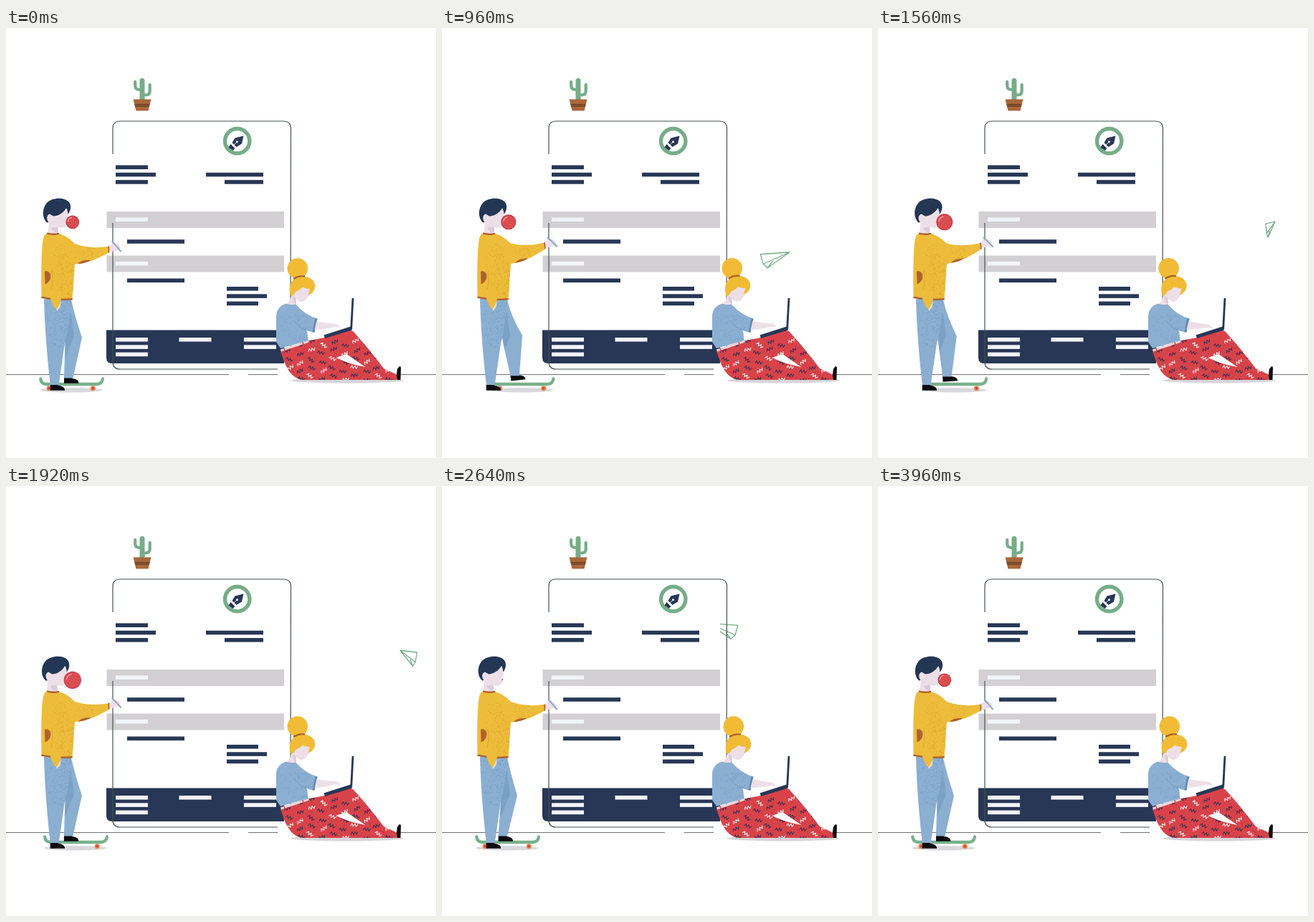
These frames come from a looping animation (600 px wide and 600 px high, 4000 ms). An HTML page with a canvas:

```html
<!DOCTYPE html>
<html lang="en">
<head>
<meta charset="utf-8">
<title>Invoice scene</title>
<style>
html, body { margin: 0; width: 100%; height: 100%; overflow: hidden; background: #fff; }
canvas { display: block; width: 600px; height: 600px; }
</style>
</head>
<body>
<canvas id="stage" width="600" height="600"></canvas>
<script>
const ctx = document.getElementById('stage').getContext('2d');
const LOOP = 4000, STEP = 40, POP = 2640, REGROW = 3200;
const NAVY = '#283755', GREEN = '#76ad88', YELLOW = '#edbc3a', BLUE = '#8bafd1',
  SKIN = '#eddfe8', BROWN = '#ad632f', RED = '#d8434a', BLACK = '#0b0a10', PALE = '#f1f4f8';

const fill = (d, color) => {
  ctx.fillStyle = color;
  ctx.fill(new Path2D(d));
};

function line(d, color, width, cap = 'butt') {
  ctx.strokeStyle = color;
  ctx.lineWidth = width;
  ctx.lineCap = cap;
  ctx.lineJoin = 'round';
  ctx.stroke(new Path2D(d));
}

function disc(x, y, r, color, ry = r) {
  ctx.fillStyle = color;
  ctx.beginPath();
  ctx.ellipse(x, y, r, ry, 0, 0, Math.PI * 2);
  ctx.fill();
}

function arc(x, y, r, from, to, color, width) {
  ctx.strokeStyle = color;
  ctx.lineWidth = width;
  ctx.lineCap = 'round';
  ctx.beginPath();
  ctx.arc(x, y, r, from, to);
  ctx.stroke();
}

function bar(x, y, w, h, color) {
  ctx.fillStyle = color;
  ctx.fillRect(x, y, w, h);
}

// Text lines stood in for by bars, one under the other
function stack(x, y, widths, color = NAVY, alignRight = false) {
  widths.forEach((w, i) => bar(alignRight ? x - w : x, y + i * 10.3, w, 5.6, color));
}

// Draws in a frame moved by (dx, dy) and turned around (px, py)
function posed(dx, dy, angle, px, py, draw) {
  ctx.save();
  ctx.translate(px + dx, py + dy);
  ctx.rotate(angle * Math.PI / 180);
  ctx.translate(-px, -py);
  draw();
  ctx.restore();
}

function clipped(d, draw) {
  ctx.save();
  ctx.clip(new Path2D(d));
  draw();
  ctx.restore();
}

function random(seed) {
  return () => (seed = (seed * 16807) % 2147483647) / 2147483647;
}

// Speckles inside a shape, denser towards the right
function grain(d, x, y, w, h, count, color) {
  const rnd = random(count * 31 + x);
  clipped(d, () => {
    for (let i = 0; i < count; i++) bar(x + w * Math.sqrt(rnd()), y + h * rnd(), 0.9, 0.9, color);
  });
}

const clamp = u => Math.max(0, Math.min(1, u));

// Smooth rise and fall between two times
const swell = (t, from, to) => Math.sin(Math.PI * clamp((t - from) / (to - from))) ** 2;

// Catmull-Rom spline through evenly timed points
function along(points, s) {
  const i = Math.min(points.length - 2, Math.floor(s)), u = s - i;
  const at = k => points[Math.max(0, Math.min(points.length - 1, k))];
  return [0, 1].map(n => {
    const [a, b, c, d] = [i - 1, i, i + 1, i + 2].map(k => at(k)[n]);
    return b + u / 2 * (c - a + u * (2 * a - 5 * b + 4 * c - d + u * (3 * (b - c) + d - a)));
  });
}

function cactus() {
  line('M180.2 75V80Q180.2 86 186 86H190M200.7 79V88Q200.7 93.5 195 93.5H190', GREEN, 4.2, 'round');
  line('M190 73.5V100', GREEN, 7, 'round');
  fill('M177.5 99.5H202.5L198.5 115.5H181.5Z', '#a9673a');
  line('M179.3 106.8H200.7M180 109H200', '#40271b', 0.9);
}

function card() {
  line('M0 483.6H311M338 483.6H379M549 483.6H600', '#6a6a70', 1);
  [256, 317.5].forEach(y => {
    bar(140.5, y, 247.5, 23, '#d2d0d3');
    stack(153, y + 8.4, [45], PALE);
  });
  stack(153, 191.5, [45, 56, 45]);
  stack(359, 201.8, [80, 54], NAVY, true);
  stack(169, 295.2, [80]);
  stack(169, 349.5, [80]);
  stack(308, 361, [44, 56, 44]);
  fill('M140 421.5H388V468H148Q140 468 140 460Z', NAVY);
  stack(153, 432, [45, 45, 45], PALE);
  stack(241.5, 432, [45], PALE);
  stack(332, 432, [45, 45], PALE);
  line('M149 176V140Q149 130 159 130H387Q397.5 130 397.5 140L397 450M379 476H159Q149 476 149 466V272', '#46514f', 1.2);
}

function nib() {
  arc(322.7, 157.7, 17.2, 0, Math.PI * 2, GREEN, 5.4);
  fill('M331.5 150.5L329 161.5L321.5 166L315.5 160L319.500 153.500Z', NAVY);
  fill('M313.500 162L319.500 168L316.500 171L310.500 166.500Z', NAVY);
  line('M316 165L322.500 158.700', '#fff', 0.8);
  disc(322.5, 158.7, 1.5, '#fff');
}

const FLIGHT = [[360, 300], [421, 306], [484, 313], [545, 284], [552, 231], [448, 200], [325, 188]];

function plane(t) {
  const s = t / 475;
  if (s > 6) return;
  const [x, y] = along(FLIGHT, s);
  const turn = Math.cos(Math.PI * clamp((t - 1085) / 1200));
  const wing = new Path2D();
  wing.addPath(new Path2D('M0 0L-41 3L-37 16.500L0 0M-37 16.500L-31 22L-24 12.500M-31 22L0 0'), new DOMMatrix([turn, 0, 0, 1, x, y]));
  clipped('M388 0H600V600H388Z', () => {
    ctx.strokeStyle = GREEN;
    ctx.lineWidth = 1.3;
    ctx.lineJoin = 'round';
    ctx.stroke(wing);
  });
}

function board(dx) {
  posed(dx, 0, 0, 0, 0, () => {
    disc(91, 505.2, 44, '#d9d8dc', 3.2);
    [60, 121.3].forEach(x => {
      disc(x, 502.7, 3.5, '#ee8148');
      disc(x, 502.7, 1.6, '#c9413a');
    });
    line('M48.300 489.500Q49 497 57 497H126Q134 497 135 489.500', '#77b18b', 4.3, 'round');
  });
}

function shoe(x, y, angle) {
  posed(x, y, angle, 0, 0, () => fill('M0 0H10.500C13 2 20.500 1.200 20.500 7.800H0Z', BLACK));
}

function legs(foot) {
  const lift = Math.max(0, foot) * 0.22, ankle = 488.5 - lift;
  const front = `M76 379H91Q96 402 ${106 + foot * 0.42} ${432 - lift}L${93.5 + foot} ${ankle}H${81 + foot}L${82.5 + foot * 0.2} 440Z`;
  shoe(81 + foot, ankle - 0.5, -lift * 2);
  fill(front, BLUE);
  clipped(front, () => fill('M84 379L91 400L95 430L82 462L76 440Z', 'rgba(96,135,178,.35)'));
  const back = 'M53 378H91Q90 410 82 440L73.500 499H62C58 465 54 420 53 378Z';
  fill(back, BLUE);
  grain(back, 52, 380, 38, 65, 230, '#6f98c2');
  shoe(61.7, 498, 0);
}

function bubble(t) {
  if (t >= POP && t < REGROW) return;
  const r = t < POP ? 9.4 + 3.5 * (t / 2320) ** 1.3
    : 9.4 * Math.sin(Math.PI / 2 * (t - REGROW) / (LOOP - REGROW));
  const x = Math.min(84 + r, 92.8), y = 270.8;
  disc(x, y, r, '#b93740');
  disc(x, y, Math.max(0, r - 0.9), '#d94d51');
  arc(x, y, r * 0.68, 3.3, 4.5, '#f3a7a5', 1.3);
}

function manHead(dx) {
  posed(dx, 0, dx * 0.7, 66, 285, () => {
    fill('M60 258L86 253Q87.500 266 85.500 273C84.500 279.500 78 279.500 73 278V287H58L60 272C54 269 54 261 60 259Z', SKIN);
    fill('M71.500 277.500L73 281L72.500 286Q66 285 63 279Z', '#dccad8');
    line('M85.800 269.500L84.300 271.300', '#9d4351', 1);
    fill('M57 271.500C50 265 50 252 57 244C64 236.500 81 235.500 87.500 242.500C91.500 247 91 254 86.500 260Q86 253 84 251.500C80 258 73 262.500 66 262.500L61 259.500C56.500 261 56 267 59.500 271Z', '#233654');
  });
}

function manBody() {
  const body = 'M56 287H74C84 290 90 295 95 300L96 330L92.500 379L49.500 375C49 345 49 320 51 300Q52 289 56 287Z';
  fill(body, YELLOW);
  grain(body, 60, 300, 35, 78, 260, '#d4a02a');
  line('M49.500 375.800Q70 380 92.700 378.200', BROWN, 2.4);
  line('M57 286.700Q66 288.700 74 286.800', BROWN, 2.4);
  fill('M70 392L77 381L75.500 389L71.500 394.500Z', SKIN);
  fill('M60 366L78 368Q78 383 70.500 392.500L67.500 390Q61 379 60 366Z', YELLOW);
  fill('M54 339.500C65 337 65 354 54.500 357.500Z', BROWN);
  line('M64 337Q66 355 63 365', '#d7a32d', 0.8);
}

function manArm(angle) {
  posed(0, 0, angle, 88, 306, () => {
    fill('M143 306L149.500 299Q160 302 159.500 308L152 311.500L143.500 312Z', SKIN);
    line('M148 297.500L160.500 312', '#8ea9cb', 2.2);
    line('M150 303L155.500 309.500', SKIN, 2);
    const sleeve = 'M78 291C94 303 114 309 143.500 304.800V313.500C131 320 116 328.500 92 330L84 312Z';
    fill(sleeve, YELLOW);
    grain(sleeve, 84, 305, 38, 24, 60, '#d9a62f');
    line('M143.400 304.500V313.500', BROWN, 1.7);
    fill('M100 329Q105 323 118.500 324.300Q110 329 100 329Z', BROWN);
  });
}

// Zigzags on a slanted grid, turned at random
function zigzags() {
  const rnd = random(77);
  for (let i = 0; i < 50; i++) {
    const x = 392 + (i % 10) * 15.5 + rnd() * 5;
    const y = 436 + Math.floor(i / 10) * 12 + (i % 2) * 5 + rnd() * 3;
    posed(x, y, rnd() * 80 - 40, 0, 0, () =>
      line('M-5 1.500L-3 -2L-1 2L1 -2L3 2L5 -1.500', i % 3 ? '#43304d' : '#f8e6e6', 1.1));
  }
}

function girlLegs() {
  const pants = 'M383 451L424 436L445 432C460 423 474 419 484 423Q506 447 527 475L545 483.500L546 491H414C402 490 393 479 388 465Z';
  disc(476, 491.8, 79, '#d7d5d9', 3.6);
  fill('M544 491L546 476Q550 469 551 474L550.500 491Z', BLACK);
  fill(pants, RED);
  grain(pants, 390, 435, 140, 55, 260, '#b92f3b');
  clipped(pants, zigzags);
  fill('M460.500 460L475 455L501.500 473Q478 469 460.500 460Z', '#fff');
  line('M383.500 450L422.500 437', '#f3d3d8', 3.4);
  line('M388 446.500L389.200 451.500M414 438L415.200 442.500', RED, 1.4);
}

function girlHead(angle) {
  posed(0, 0, angle, 398, 385, () => {
    fill('M402 360L425 358Q425 376 414.500 382Q409 383 404.500 377.500L405 388L389 388Q399 380 399 367Z', SKIN);
    fill('M404.500 377L405 386Q399 382 400 374Z', '#dfcbd8');
    disc(406.8, 335.5, 14.3, '#f1bb35');
    fill('M398 374C392.500 364 397 347 413 346.500C426 346 433 355 431 363Q429 370 421.500 373L424 364Q418 364 414 361.500Q410 366 404 368Q402 373 398 374Z', '#f1bb35');
    line('M401 350Q409 345 417 346.700', '#a86229', 2.2);
  });
}

function girlBody() {
  const shirt = 'M391 384.500Q377 389 377 403V438L383 447L422 436C420 431 422 427 419 422L430 425L434.500 405.500Q418 401 404 385.500Q397 387 391 384.500Z';
  fill(shirt, BLUE);
  grain(shirt, 379, 400, 44, 45, 130, '#7199c3');
  line('M433 405.500L429 424.500', '#6186b1', 3);
  line('M402 408Q407 417 419 422', '#6f97c0', 0.8);
}

function girlHand(t) {
  const tap = Math.sin(t / LOOP * Math.PI * 16);
  posed(0, 0, tap * 2.2 - 1, 432, 415, () =>
    fill('M433.500 409Q448 412.500 461 413.500L466.500 417L465 418.600L459 417.800Q444 421 430.500 421Z', SKIN));
}

function laptop() {
  line('M484 377L481.700 420', NAVY, 2.8);
  fill('M443.500 428.500L481 416.500L483 421.500L445 433Z', NAVY);
}

function render(now) {
  const t = Math.floor((now % LOOP) / STEP) * STEP;
  bar(0, 0, 600, 600, '#fff');
  cactus();
  plane(t);
  card();
  nib();
  board(22 * swell(t, 0, 2320));
  legs(15.5 * swell(t, 150, 2100) - 5 * swell(t, 1700, 2940));
  manHead(swell(t, 2500, 4000) - 1.6 * swell(t, 1200, 3200));
  manBody();
  manArm(-6.4 * swell(t, 150, 2320));
  bubble(t);
  girlLegs();
  girlHead(-3 * swell(t, 480, 1900));
  girlBody();
  laptop();
  girlHand(t);
  requestAnimationFrame(render);
}
requestAnimationFrame(render);
</script>
</body>
</html>
```
